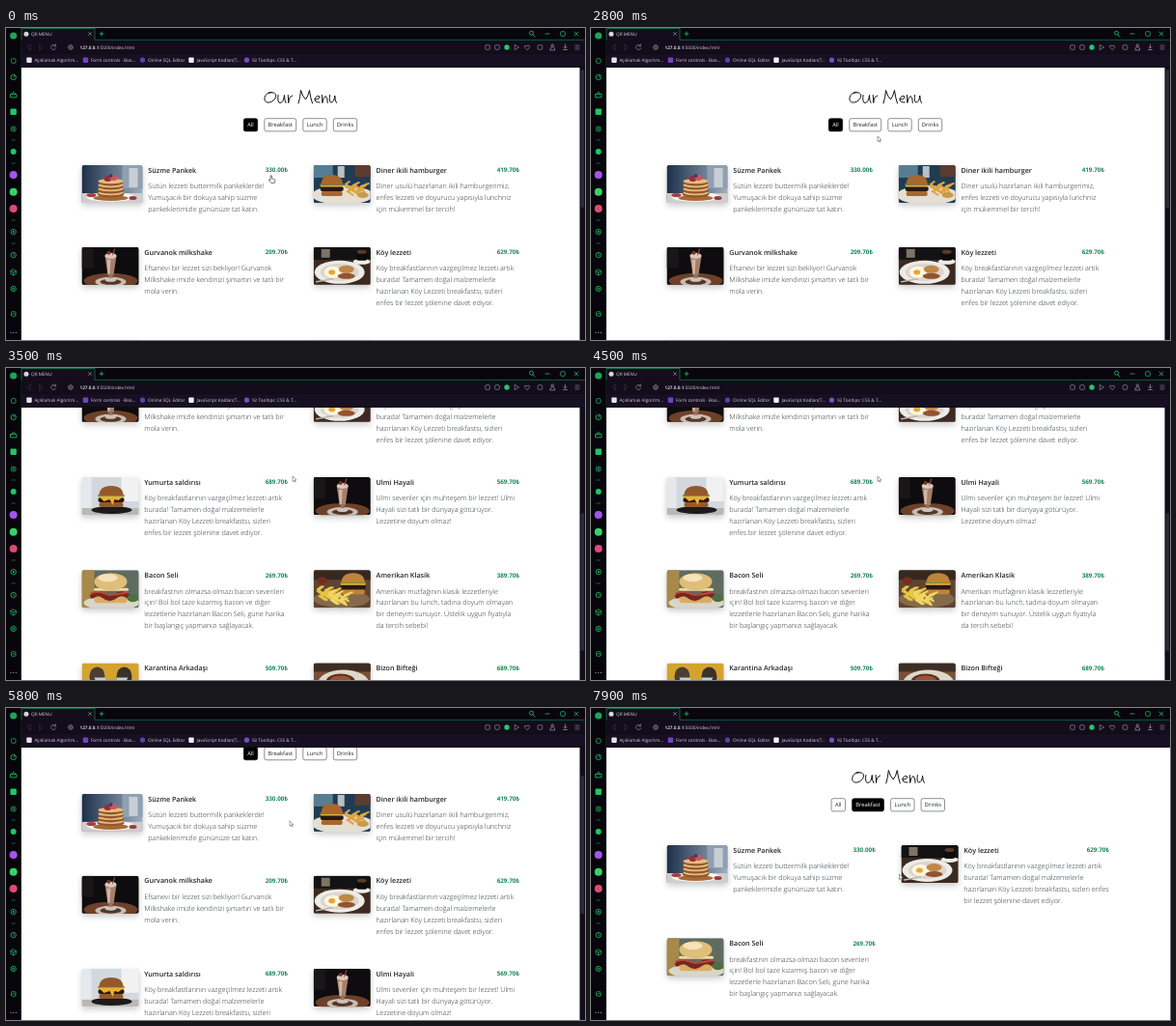
These frames come from a looping animation (600x323 px, 8000 ms). An HTML page:

```html
<!DOCTYPE html>
<html lang="tr">
<head>
<meta charset="utf-8">
<title>QR MENU</title>
<style>
html, body { margin: 0; width: 100%; height: 100%; overflow: hidden; background: #09060f; }
svg { display: block; }
text { font-family: "Open Sans", "Noto Sans", sans-serif; text-rendering: geometricPrecision; }
.name { font-size: 7.15px; font-weight: 600; fill: #212529; }
.desc { font-size: 7.25px; font-weight: 300; fill: #2b3035; }
.price { font-size: 6.3px; font-weight: 700; fill: #198754; text-anchor: end; }
.btn { font-size: 5.8px; text-anchor: middle; }
.bar { font-size: 4.7px; fill: #d6d2dc; }
.line { fill: none; stroke-linecap: round; stroke-linejoin: round; }
.photo { filter: drop-shadow(0 3px 3px rgba(0,0,0,.2)); }
</style>
</head>
<body>
<svg id="stage" viewBox="0 0 600 323" width="100%" height="100%"></svg>
<script>
const el = (tag, attrs, inner = '') =>
  `<${tag} ${Object.entries(attrs).map(([k, v]) => `${k}="${v}"`).join(' ')}>${inner}</${tag}>`;
const rect = (x, y, width, height, fill, rx = 0) => el('rect', { x, y, width, height, fill, rx });
const oval = (cx, cy, rx, ry, fill) => el('ellipse', { cx, cy, rx, ry, fill });
const shape = (d, fill) => el('path', { d, fill });
const line = (d, stroke, w = .8) => el('path', { d, stroke, 'stroke-width': w, class: 'line' });
const text = (x, y, cls, s, extra = {}) => el('text', { x, y, class: cls, ...extra }, s);

// Food pictures, each drawn in a 64 x 39 box
const fries = (x, y, n, color) => Array.from({ length: n }, (_, i) =>
  line(`M${x + i * 19 % 17} ${y + i * 7 % 9}l${4 + i % 3 * 2} ${i % 2 ? 4 : -3}`, color, 2)).join('');
const burger = (x, y, w, bun = '#b8762f') =>
  rect(x, y + 14, w, 5, bun, 2) + rect(x - 1, y + 9, w + 2, 5, '#2c1811', 2) +
  line(`M${x} ${y + 8.5}h${w}`, '#e0b03c', 2) + line(`M${x - 1} ${y + 7}h${w + 2}`, '#6d8738', 1.4) +
  shape(`M${x} ${y + 7}q0-10 ${w / 2}-10t${w / 2} 10z`, bun);

const shake = () => rect(0, 0, 64, 39, '#0e0c0f') + rect(0, 0, 12, 22, '#1a1618') +
  oval(30, 35, 28, 8, '#6d4128') + oval(30, 36, 16, 5, '#c9bcb2') + oval(30, 36, 11, 3, '#54382c') +
  shape('M24 9h12l-3 20h-6z', '#a67f6a') + shape('M26 13h4l-1 15h-2z', '#d3b5a2') +
  rect(28, 28, 4, 5, '#8d7468') + oval(30, 34, 6, 2, '#d2c1b5') +
  oval(30, 9, 6, 3, '#d9c8bd') + line('M32 8l2-6', '#a8473c', 1.1) + oval(28, 6, 2, 2, '#7c3227');

const pics = {
  pancake: () => rect(0, 0, 64, 39, 'url(#sky)') + rect(42, 0, 22, 24, '#8fa0b2') + rect(49, 3, 9, 20, '#c8ced4') +
    rect(0, 29, 64, 10, '#d0cdcd') + oval(30, 33, 25, 5, '#f7f4ef') + oval(30, 34, 18, 3, '#a86a36') +
    [30, 26, 22, 18].map((y, i) => oval(30, y, 14 - i * .4, 3.5, '#92582c') + oval(30, y - 1.4, 13, 2.6, '#e8bd7e')).join('') +
    oval(27, 14, 4, 3, '#9c2a38') + oval(33, 13, 4, 3, '#cf5560') + oval(30, 11, 2, 2, '#394167') +
    oval(10, 31, 5, 2, '#a83e43') + oval(53, 34, 4, 2, '#9a3b42'),
  diner: () => rect(0, 0, 64, 39, '#1f3c52') + rect(0, 0, 20, 13, '#587c92') + rect(43, 0, 16, 12, '#5c3c30') +
    rect(25, 1, 7, 12, '#b9c1c2') + oval(30, 31, 32, 10, '#e4dfd2') + burger(8, 13, 22, '#a8672e') +
    fries(33, 20, 18, '#dfa540') + oval(51, 31, 6, 3, '#c79a4c'),
  shake,
  village: () => rect(0, 0, 64, 39, '#3c2a22') + rect(0, 0, 64, 13, '#131214') + rect(8, 2, 9, 9, '#7d7468') +
    oval(27, 26, 26, 12, '#eeece7') + oval(27, 26, 20, 9, '#dad6ce') + oval(20, 26, 9, 6, '#fff7df') +
    oval(19, 26, 3.5, 2.6, '#e2a73c') + oval(34, 23, 8, 4, '#c08848') + oval(34, 30, 9, 3, '#94522f') +
    oval(50, 15, 9, 3, '#f1eee7') + rect(44, 4, 12, 10, '#0c0c0e', 3) + oval(50, 5, 5, 2, '#5d3a26') + line('M3 36l17-3', '#bcb7ad', 1.4),
  egg: () => rect(0, 0, 64, 39, '#d2d8de') + rect(0, 0, 10, 39, '#e6e9ec') + rect(41, 0, 20, 25, '#f1f1f1') +
    rect(0, 32, 64, 7, '#b9b8b6') + oval(31, 34, 21, 4, '#1c1a1a') + burger(18, 12, 25, '#94592a') +
    shape('M18 20h25l-5 4-4-1-2 6-3-6-6 2z', '#eab032'),
  bacon: () => rect(0, 0, 64, 39, '#5f6a60') + rect(0, 0, 13, 39, '#a9884a') + oval(31, 34, 29, 7, '#d8d6ca') +
    rect(13, 27, 34, 7, '#d9ac64', 3) + line('M11 27q6-5 12 0t12 0 13 0', '#7b2521', 5) +
    line('M10 24q7-3 13 0t24-1', '#b44c36', 2) + line('M14 20h33', '#f0d9a0', 3) +
    oval(30, 12, 17, 9, '#e0bd78') + oval(27, 8, 10, 4, '#f5e2b8') + oval(53, 29, 6, 4, '#4e7040'),
  classic: () => rect(0, 0, 64, 39, '#5f4330') + rect(0, 0, 64, 10, '#35291f') + oval(29, 30, 29, 9, '#84694a') +
    burger(29, 6, 24, '#c08438') + fries(4, 20, 26, '#e6c544') + fries(16, 24, 20, '#f0d662') + oval(9, 11, 5, 4, '#7c2a20'),
  couple: () => rect(0, 0, 64, 39, '#d3a42d') + oval(16, 14, 8, 10, '#4e3c32') + oval(44, 14, 8, 10, '#3c302b') +
    shape('M3 39q2-16 14-15t12 15M31 39q2-16 14-15t14 15', '#718795') +
    shape('M13 15h12l-2 7h-7zM36 15h12l-4 7h-6z', '#b9d4da'),
  steak: () => rect(0, 0, 64, 39, '#785039') + rect(0, 0, 64, 9, '#3d2d25') + oval(31, 22, 27, 15, '#ded7c9') +
    oval(28, 19, 15, 8, '#60301f') + oval(28, 18, 11, 5, '#9e5233') + oval(45, 23, 7, 5, '#758a42')
};

const items = [
  { name: 'Süzme Pankek', price: '330.00', pic: 'pancake', w: 63, breakfast: 1, lines: ['Sütün lezzeti buttermilk pankeklerde!', 'Yumuşacık bir dokuya sahip süzme', 'pankeklerimizle gününüze tat katın.'] },
  { name: 'Diner ikili hamburger', price: '419.70', pic: 'diner', lines: ['Diner usulü hazırlanan ikili hamburgerimiz,', 'enfes lezzeti ve doyurucu yapısıyla lunchniz', 'için mükemmel bir tercih!'] },
  { name: 'Gurvanok milkshake', price: '209.70', pic: 'shake', lines: ['Efsanevi bir lezzet sizi bekliyor! Gurvanok', 'Milkshake imizle kendinizi şımartın ve tatlı bir', 'mola verin.'] },
  { name: 'Köy lezzeti', price: '629.70', pic: 'village', breakfast: 1,
    lines: ['Köy breakfastlarının vazgeçilmez lezzeti artık', 'burada! Tamamen doğal malzemelerle', 'hazırlanan Köy Lezzeti breakfastsı, sizleri', 'enfes bir lezzet şölenine davet ediyor.'],
    wide: ['Köy breakfastlarının vazgeçilmez lezzeti artık', 'burada! Tamamen doğal malzemelerle', 'hazırlanan Köy Lezzeti breakfastsı, sizleri enfes', 'bir lezzet şölenine davet ediyor.'] },
  { name: 'Yumurta saldırısı', price: '689.70', pic: 'egg', lines: ['Köy breakfastlarının vazgeçilmez lezzeti artık', 'burada! Tamamen doğal malzemelerle', 'hazırlanan Köy Lezzeti breakfastsı, sizleri', 'enfes bir lezzet şölenine davet ediyor.'] },
  { name: 'Ulmi Hayali', price: '569.70', pic: 'shake', lines: ['Ulmi sevenler için muhteşem bir lezzet! Ulmi', 'Hayali sizi tatlı bir dünyaya götürüyor.', 'Lezzetine doyum olmaz!'] },
  { name: 'Bacon Seli', price: '269.70', pic: 'bacon', breakfast: 1, lines: ['breakfastnın olmazsa olmazı bacon sevenleri', 'için! Bol bol taze kızarmış bacon ve diğer', 'lezzetlerle hazırlanan Bacon Seli, güne harika', 'bir başlangıç yapmanızı sağlayacak.'] },
  { name: 'Amerikan Klasik', price: '389.70', pic: 'classic', lines: ['Amerikan mutfağının klasik lezzetleriyle', 'hazırlanan bu lunch, tadına doyum olmayan', 'bir deneyim sunuyor. Üstelik uygun fiyatıyla', 'da tercih sebebi!'] },
  { name: 'Karantina Arkadaşı', price: '509.70', pic: 'couple', lines: [] },
  { name: 'Bizon Bifteği', price: '689.70', pic: 'steak', lines: [] }
];

function card(item, x, y, right, wide) {
  const w = item.w || 59, tx = x + w + 5.8;
  const lines = wide && item.wide || item.lines;
  const photo = el('g', { 'clip-path': `url(#round${w})` }, pics[item.pic]());
  return el('g', { class: 'photo', transform: `translate(${x} ${y})` }, photo) +
    text(tx, y + 7.8, 'name', item.name) + text(right, y + 7.4, 'price', item.price + '₺') +
    lines.map((s, i) => text(tx, y + 24.3 + i * 11.9, 'desc', s)).join('');
}

const title = line('M275 66.5C270 66 266.5 72 268.5 75.500S278 76.500 279.500 71.500 275 66 272 67.500' +
  'M282 69.500q-1 8 2 8 3.500 0 4.500-8 0 6 1.500 8M292.300 69.500l.5 8q0-6 4-7.500' +
  'M303 78q2-6 2.500-13.500 2 7 5 9.500 2.500-3 4-9.500 1 8 3 13.500' +
  'M320 74q5.500 0 5-3-2.500-2-4.800 1.500-1 5 5 4.500M327.500 69.500l.3 8q1-6.500 3.500-7 2 1 2 7' +
  'M335.500 69.500q-1 7.500 1.500 7.500 3 0 3.800-7 0 6 1.700 7.500', '#111', 1);

function view(list, active, shift) {
  const buttons = [['All', 246, 15], ['Breakfast', 267.5, 33.5], ['Lunch', 307.5, 25], ['Drinks', 339, 25]]
    .map(([s, x, w]) => {
      const on = s === active;
      return el('rect', { x: x + .3, y: 93.7, width: w - .6, height: 13.2, rx: 2, fill: on ? '#000' : '#fff', stroke: on ? '#000' : '#42464a', 'stroke-width': .6 }) +
        text(x + w / 2, 102.4, 'btn', s, { fill: on ? '#fff' : '#212529' });
    }).join('');
  let y = 142, cards = '';
  for (let i = 0; i < list.length; i += 2) {
    const row = list.slice(i, i + 2);
    cards += row.map((item, c) => card(item, c ? 318.7 + shift : 78.5, y, c ? 532 + shift * 1.8 : 292 + shift, shift)).join('');
    y += row.some(r => r.lines.length !== 3) ? 96.2 : 84.8;
  }
  return el('g', { transform: `translate(${shift} 0)` }, title + buttons) + cards;
}

function chrome() {
  const green = '#20c568', gray = '#8f8a98';
  const at = (x, y, inner) => el('g', { transform: `translate(${x} ${y})` }, inner);
  const ring = (x, y, c, r = 2.7) => el('circle', { cx: x, cy: y, r, fill: 'none', stroke: c, 'stroke-width': .8 });
  const cross = (x, y, r, c) => line(`M${x - r} ${y - r}l${2 * r} ${2 * r}m0 ${-2 * r}l${-2 * r} ${2 * r}`, c, .7);
  const box = (x, y, c) => el('rect', { x: x - 2.3, y: y - 2.3, width: 4.6, height: 4.6, rx: 1, fill: 'none', stroke: c, 'stroke-width': .7 });

  let s = rect(0, 0, 600, 41, '#08050e') + rect(0, 0, 15.5, 323, '#07050b') + rect(16, 0, 76, 13, '#140d1c') +
    rect(16, 12.6, 584, 14.2, '#120c1b') + rect(16, 26.8, 584, 13.8, '#170f22') +
    line('M16 12V.5h76V12.3h508', '#17864a', .7) + line('M15.6 0V323', '#143d29', .5);
  // Tab and window controls
  s += oval(21, 6.2, 2.5, 2.5, '#d5d5da') + text(26, 8, 'bar', 'QR MENU') + cross(87, 6, 1.5, gray) +
    line('M97 6h4m-2-2v4', green) + ring(544.5, 5.2, green, 2) + line('M546 7l2 2', green) +
    line('M559 6h4', green) + box(577, 6, green) + cross(591, 6, 2, green);
  // Address row
  s += line('M25 17l-3 3 3 3z', '#3f3a47', .6) + line('M35 17l3 3-3 3z', '#3f3a47', .6) +
    line('M51 18a2.6 2.6 0 1 0 .7 2.8M51.6 16.8v2h-2', gray, .7) + ring(67, 20, gray, 2.3) +
    line('M65 20h4m-2-2v4', gray, .5) +
    text(76.5, 22, 'bar', '<tspan font-weight="600" fill="#fff">127.0.0.1</tspan>:5500/index.html') +
    box(499, 20, gray) + box(509, 20, gray) + oval(519, 20, 2.7, 2.7, '#26c66b') +
    line('M527.5 17.5l4 2.5-4 2.5z', gray, .7) + line('M540 22.5l-2.5-2.7q0-3 2.5-1 2.5-2 2.5 1z', gray, .7) +
    box(553.5, 20, gray) + line('M563.8 22.5q0-3 2.5-3t2.5 3z', gray) + ring(566.3, 18, gray, 1.2) +
    line('M579.5 17v4m-1.5-1.5l1.5 1.5 1.5-1.5m-3.5 3h4', gray) + line('M590 18h4m-4 2h4m-4 2h4', gray, .6);
  // Bookmarks
  s += [['Açıklamalı Algoritm...', 24, '#e8e5e5'], ['Form controls · Boo...', 82.5, '#7441c4'], ['Online SQL Editor', 141.5, '#5643a6'],
    ['JavaScript Kodları(T...', 192, '#f3f3f3'], ['92 Tooltips: CSS &amp; T...', 249.5, '#7450bc']]
    .map(([t, x, c], i) => (i === 2 || i === 4 ? oval(x, 33.2, 2.6, 2.6, c) : rect(x - 2.7, 30.5, 5.4, 5.4, c, .8)) +
      text(x + 5.4, 35, 'bar', t)).join('');
  // Sidebar
  s += oval(7.7, 8, 3.6, 3.6, '#1aa557') + box(7.7, 34, green) + ring(7.7, 51, green) + line('M7.7 51l1.5-2', green) +
    line('M4.5 71.5v-3h6.4v3zM6 68l1.7-2 1.7 2', green) + rect(4.5, 83.5, 6.4, 6.4, green, 1) +
    box(7.7, 104.5, green) + ring(7.7, 104.5, green, 1) + oval(7.7, 128, 3, 3, green) +
    oval(7.7, 152, 4, 4, '#a554ec') + oval(7.7, 169.7, 4, 4, '#36d467') + oval(7.7, 187, 4, 4, '#dd4a72') +
    [116, 140, 199, 223].map(y => line(`M6 ${y}h3.4`, '#177a43')).join('') +
    ring(7.7, 211, green) + shape('M7 209.5l2.2 1.5-2.2 1.5z', green) + ring(7.7, 235, green) + line('M7.7 233.5v1.7l1.2.6', green, .6) +
    at(7.7, 253, line('M0-3l2.7 1.5v3L0 3l-2.7-1.5v-3zM-2.7-1.5L0 0l2.7-1.5M0 0v3', green, .7)) +
    ring(7.7, 270, green) + ring(7.7, 270, green, 1) + box(7.7, 296, green) + line('M6 297l2-2 2 2', green, .6) +
    [5, 7.7, 10.4].map(x => oval(x, 315.5, .6, .6, '#bdb9c2')).join('');
  return s;
}

const stage = document.getElementById('stage');
stage.innerHTML =
  `<defs>
    <linearGradient id="sky"><stop stop-color="#1d2f4a"/><stop offset="1" stop-color="#9fb0c2"/></linearGradient>
    <clipPath id="page"><rect x="15.8" y="41" width="584.2" height="282"/></clipPath>
    ${[59, 63].map(w => `<clipPath id="round${w}"><rect width="${w}" height="39.3" rx="2.2"/></clipPath>`).join('')}
  </defs>` + chrome() +
  el('g', { 'clip-path': 'url(#page)' }, rect(15.8, 41, 585, 282, '#fff') +
    el('g', { id: 'all' }, view(items, 'All', 0)) +
    el('g', { id: 'morning' }, view(items.filter(i => i.breakfast), 'Breakfast', 2.8)) +
    el('g', { id: 'scrollbar' }, rect(594.5, 41, 6, 282, '#120d1a') + el('g', { id: 'thumb' }, rect(595.6, 43, 3.4, 143, '#2f2a3b', 1.5)))) +
  el('g', { id: 'cursor' },
    el('path', { id: 'arrow', d: 'M0-2v5.500l1.300-1.100.8 1.800.9-.4-.8-1.700h1.700z', fill: '#fff', stroke: '#333', 'stroke-width': .45 }) +
    el('path', { id: 'hand', d: 'M-1-3q1-1 1.5 0v2.8l2.8.7q.8.3.6 1.3l-.6 2.6h-3.6l-2.4-3q0-1 1.7 0z', fill: '#fff', stroke: '#222', 'stroke-width': .6 }));

const [all, morning, scrollbar, thumb, cursor, arrow, hand] =
  ['all', 'morning', 'scrollbar', 'thumb', 'cursor', 'arrow', 'hand'].map(id => document.getElementById(id));
const show = (node, on) => node.style.display = on ? '' : 'none';

// Eased value between [time, value] keys
function track(t, keys) {
  const i = keys.findIndex(k => k[0] > t);
  if (i < 0) return keys[keys.length - 1][1];
  if (i === 0) return keys[0][1];
  const [t0, a] = keys[i - 1], [t1, b] = keys[i], p = (t - t0) / (t1 - t0);
  return a + (b - a) * p * p * (3 - 2 * p);
}

const scrollKeys = [[2800, 0], [3500, 210], [5150, 210], [5400, 162], [6050, 0]];
const xKeys = [[1900, 275], [2700, 297], [4600, 297], [5400, 295.5], [6400, 291.3], [6700, 291.3], [6950, 287], [7250, 287], [7850, 319.5]];
const yKeys = [[1900, 156], [2700, 114], [4600, 114], [5400, 121], [6400, 114.5], [6700, 114.5], [6950, 102], [7250, 102], [7850, 174]];

function frame(now) {
  const t = now % 8000, filtered = t >= 7050;
  const scroll = track(t, scrollKeys), x = track(t, xKeys), y = track(t, yKeys);
  const onCard = x < 292.5 && y > 142, onButton = x > 268 && x < 301 && y > 93 && y < 107;
  show(all, !filtered);
  show(morning, filtered);
  show(scrollbar, !filtered);
  all.setAttribute('transform', `translate(0 ${-scroll})`);
  thumb.setAttribute('transform', `translate(0 ${scroll * .51})`);
  cursor.setAttribute('transform', `translate(${x} ${y})`);
  show(hand, onCard || onButton);
  show(arrow, !(onCard || onButton));
  requestAnimationFrame(frame);
}
requestAnimationFrame(frame);
</script>
</body>
</html>
```
